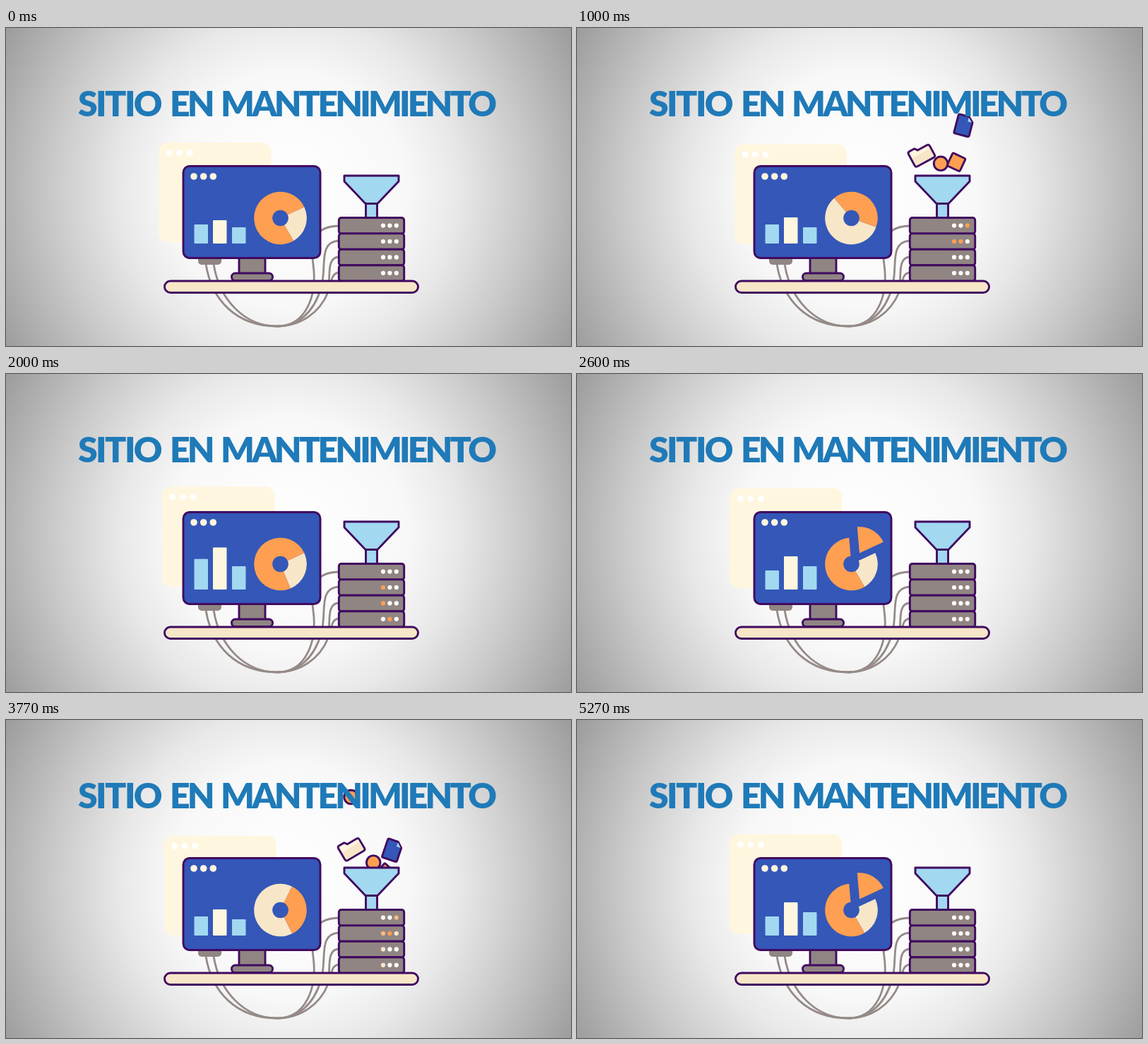
Recreate the animation shown at these times as an HTML page. Size 800 by 450 pixels, loop 5.31 s.

```html
<!DOCTYPE html>
<html lang="es">
<head>
<meta charset="utf-8">
<title>Sitio en mantenimiento</title>
<style>
  html, body { margin: 0; width: 100%; height: 100%; overflow: hidden; background: #ddd; }
  svg { display: block; width: 800px; height: 450px; }
  .title { font: 900 50px Lato, "Open Sans", sans-serif; fill: #1f7ab8; }
  .line { stroke: #400a60; stroke-width: 2.9; stroke-linejoin: round; }
  .gray { fill: #908583; }
  .sky { fill: #a2d8f0; }
  .cream { fill: #fff6df; }
  .sand { fill: #f8e6c8; }
  .orange { fill: #ff9f51; }
  .blue { fill: #3457b8; }
  .cable { fill: none; stroke: #958a87; stroke-width: 2.8; }
</style>
</head>
<body>
<svg viewBox="0 0 800 450">
  <defs>
    <radialGradient id="bg" gradientUnits="userSpaceOnUse" cx="400" cy="228" r="462">
      <stop offset="0" stop-color="#fff"/>
      <stop offset=".36" stop-color="#f8f8f8"/>
      <stop offset=".52" stop-color="#e8e8e8"/>
      <stop offset=".72" stop-color="#cacaca"/>
      <stop offset=".87" stop-color="#b1b1b1"/>
      <stop offset="1" stop-color="#9b9b9b"/>
    </radialGradient>
    <clipPath id="drop"><rect x="440" y="87" width="150" height="122"/></clipPath>
  </defs>
  <rect width="800" height="450" fill="url(#bg)"/>

  <g id="window">
    <rect class="cream" width="159" height="141" rx="12"/>
    <g fill="#fff"><circle cx="15" cy="14.5" r="4.5"/><circle cx="29.5" cy="14.5" r="4.5"/><circle cx="44" cy="14.5" r="4.5"/></g>
  </g>

  <g class="cable">
    <path d="M471 280C428 281 432 315 435 335C441 380 424 422 384 422C326 422 291 385 283 334"/>
    <path d="M471 301C441 303 455 340 446 368C436 402 414 422 384 422"/>
    <path d="M471 324C453 325 460 352 456 374C444 403 417 422 384 422C338 422 302 385 294 334"/>
    <path d="M471 346C461 347 461 358 457 373"/>
  </g>

  <rect class="gray" x="272" y="322" width="33" height="13" rx="5"/>
  <rect class="gray line" x="330" y="322" width="37" height="28"/>
  <rect class="gray line" x="319.5" y="347" width="58" height="10.5" rx="5"/>
  <rect class="blue line" x="251" y="195.5" width="194" height="130" rx="9"/>
  <g class="cream"><circle cx="266" cy="210" r="4.8"/><circle cx="279.7" cy="210" r="4.8"/><circle cx="293.3" cy="210" r="4.8"/></g>
  <g id="bars">
    <rect class="sky" x="266.5" width="19.5" rx="1"/>
    <rect class="cream" x="293" width="19.5" rx="1"/>
    <rect class="sky" x="320" width="19.5" rx="1"/>
  </g>
  <path id="light" class="sand"/>
  <path id="dark" class="orange"/>
  <path id="wedge" class="orange"/>
  <circle class="blue" cx="388.5" cy="269" r="11.3"/>

  <g clip-path="url(#drop)">
    <g id="square"><rect class="orange line" x="-10" y="-10" width="20" height="20" rx="2"/></g>
    <g id="ball"><circle class="orange line" r="9.8"/></g>
    <g id="folder">
      <path class="cream line" d="M-16-9Q-16-12-13-12H-5L-2-8H13Q16-8 16-5V9Q16 12 13 12H-13Q-16 12-16 9Z"/>
      <path class="sand" d="M-14-2H14V10H-14Z"/>
    </g>
    <g id="file">
      <path class="blue line" d="M-11-12Q-11-14-9-14H4L11-7V12Q11 14 9 14H-9Q-11 14-11 12Z"/>
      <path class="sky" d="M4-13V-7H10Z"/>
    </g>
    <g id="lastBall"><circle class="orange line" r="9.8"/></g>
  </g>
  <rect class="sky line" x="509.5" y="248" width="16" height="22"/>
  <path class="sky line" d="M479 209H556V217L526 248.5H509L479 217Z"/>
  <g id="servers"></g>
  <rect class="sand line" x="224.5" y="358" width="359" height="16.5" rx="8.2"/>

  <text class="title" y="125"><tspan x="102" letter-spacing="-2.6">SITIO</tspan><tspan x="232" letter-spacing="-4">EN</tspan><tspan x="304" letter-spacing="-3.85">MANTENIMIENTO</tspan></text>
</svg>
<script>
const LOOP = 5310, CYCLE = 2667, SNAP = 2610;
const $ = id => document.getElementById(id);
const set = (el, attrs) => { for (const k in attrs) el.setAttribute(k, attrs[k]); };
const add = (parent, tag, attrs) => {
  const el = document.createElementNS("http://www.w3.org/2000/svg", tag);
  set(el, attrs);
  return parent.appendChild(el);
};

// Smooth step from 0 at time a to 1 at time b
const ease = (t, a, b) => {
  const p = Math.min(1, Math.max(0, (t - a) / (b - a)));
  return p * p * (3 - 2 * p);
};
const random = seed => {
  const v = Math.sin(seed * 127.1 + 31.7) * 43758.5453;
  return v - Math.floor(v);
};

function drawWindow(t) {
  const turn = 2 * Math.PI * t / CYCLE;
  const x = 220.4 - 4.2 * Math.cos(turn - 0.14);
  const y = 162 + 2.6 * Math.sin(turn) - 0.6 * Math.sin(2 * turn);
  set($("window"), { transform: `translate(${x} ${y})` });
}

function drawBars(t) {
  const back = ease(t, SNAP, CYCLE), settle = ease(t, 1703, 2600);
  const tops = [
    278 - 22 * (ease(t, 1103, 1500) - settle),
    272 - 4 * ease(t, 0, 1000) - 27 * ease(t, 1103, 1703) + 17 * settle + 14 * back,
    282 - 10 * (ease(t, 1500, 1703) - back)
  ];
  tops.forEach((y, i) => set($("bars").children[i], { y, height: 305 - y }));
}

function slice(from, to, dx = 0, dy = 0) {
  const cx = 388.5 + dx, cy = 269 + dy, r = 37.3;
  const at = a => `${cx + r * Math.cos(a * Math.PI / 180)} ${cy + r * Math.sin(a * Math.PI / 180)}`;
  return `M${cx} ${cy}L${at(from)}A${r} ${r} 0 ${to - from > 180 ? 1 : 0} 1 ${at(to)}Z`;
}

// The two edges of the orange part turn once per cycle, one after the other
function drawPie(t) {
  const from = 60 + 370 * ease(t, 600, 1450) - 10 * ease(t, 1703, 2600);
  const to = 335 + 360 * ease(t, 775, 1795);
  const out = ease(t, 2150, 2400) - ease(t, SNAP, CYCLE);
  const cut = out > 0 ? to - 70 : to;
  set($("light"), { d: slice(to, from + 360) });
  set($("dark"), { d: slice(from, cut) });
  set($("wedge"), { d: out > 0 ? slice(cut, to, 11.5 * out, -15.5 * out) : "" });
}

const lamps = [];
for (let row = 0; row < 4; row++) {
  const y = 268.5 + row * 22.4;
  add($("servers"), "rect", { class: "gray line", x: 471.3, y, width: 92.4, height: 22.4, rx: 3.5 });
  for (let n = 0; n < 3; n++)
    lamps.push(add($("servers"), "circle", { cx: 534 + n * 9.4, cy: y + 11.1, r: 3.1 }));
}

// Each lamp picks white or orange at random per slot; all rest white at the end
function drawLamps(t) {
  const SLOT = 330, slot = Math.floor(t / SLOT);
  const lit = (n, s) => s > 0 && s < 7 && random(n + 12 * s) > 0.62 ? 1 : 0;
  lamps.forEach((lamp, n) => {
    const a = lit(n, slot), b = lit(n, slot + 1);
    const glow = a + (b - a) * ease(t - slot * SLOT, 0, SLOT);
    set(lamp, { fill: `rgb(255 ${255 - 96 * glow} ${250 - 169 * glow})` });
  });
}

// Each item drops at a steady speed, lands, hops and sinks into the funnel.
// hop, pull, drift and spin are per millisecond
const FALL = 0.45;
const items = {
  ball: { land: 700, x: 500, y: 202, hop: 0.13, pull: 0.00032, drift: 0.05, turn: 0, spin: 0 },
  square: { land: 830, x: 537, y: 197, hop: 0.23, pull: 0.0011, drift: 0, turn: -3, spin: 0.165 },
  folder: { land: 930, x: 487, y: 178, hop: -0.01, pull: 0.00006, drift: 0.012, turn: -27, spin: -0.02 },
  file: { land: 1110, x: 547, y: 187, hop: 0, pull: 0.00016, drift: -0.006, turn: 19, spin: 0.04 },
  lastBall: { land: 1235, x: 498, y: 168, hop: 0.068, pull: 0.00033, drift: 0.072, turn: 0, spin: 0 }
};

function drawItem(id, t) {
  const { land, x, y, hop, pull, drift, turn, spin } = items[id];
  const s = t - land;
  const shift = s < 0 ? FALL * s : pull * s * s - hop * s;
  set($(id), { transform: `translate(${x + drift * s} ${y + shift}) rotate(${turn + spin * s})` });
}

function draw(now) {
  const t = (now % LOOP) % CYCLE;
  drawWindow(t);
  drawBars(t);
  drawPie(t);
  drawLamps(t);
  for (const id in items) drawItem(id, t);
}

const start = performance.now();
function tick() {
  draw(performance.now() - start);
  requestAnimationFrame(tick);
}
tick();
</script>
</body>
</html>
```
